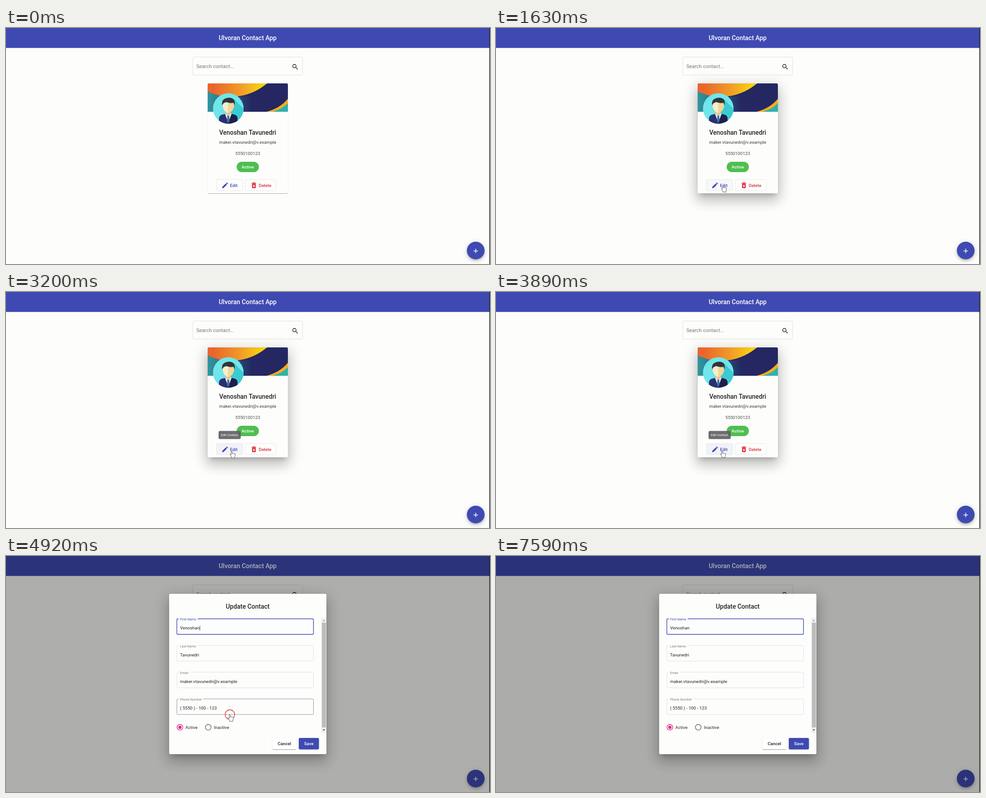
Write an HTML page that moves like this. It is 1068 px wide and 524 px high and loops after 8000 ms.

```html
<!DOCTYPE html>
<html lang="en">
<head>
<meta charset="utf-8">
<title>Contacts</title>
<style>
  html, body { margin: 0; width: 100%; height: 100%; overflow: hidden; background: #fdfdfc; }
  svg { display: block; width: 100%; height: 100%; font-family: Roboto, sans-serif; }
</style>
</head>
<body>
<svg id="stage" viewBox="0 0 1068 524" preserveAspectRatio="none"></svg>
<script>
const LOOP = 8000;
const UNIT = 0.695; // stage pixels per layout pixel
const PAPER = '#fdfdfc', INDIGO = '#3e4ab2', RED = '#dc2f3c', PINK = '#e3268b', INK = '#232323';
const BODY = 14 * UNIT, TITLE = 20 * UNIT, LABEL = 10.5 * UNIT;

const contact = {
  first: 'Venoshan', last: 'Tavunedri',
  email: 'maker.vtavunedri@v.example',
  phone: '5550100123', phoneMask: '( 5550 ) - 100 - 123'
};

// Elevation layers: offset y, blur, spread, alpha
const elevation = {
  1: [[2, 1, -1, .2], [1, 1, 0, .14], [1, 3, 0, .12]],
  2: [[3, 1, -2, .2], [2, 2, 0, .14], [1, 5, 0, .12]],
  6: [[3, 5, -1, .2], [6, 10, 0, .14], [1, 18, 0, .12]],
  24: [[11, 15, -7, .2], [24, 38, 3, .14], [9, 46, 8, .12]]
};

const icons = {
  search: 'M15.5 14h-.79l-.28-.27A6.47 6.47 0 0 0 16 9.5 6.5 6.5 0 1 0 9.5 16c1.61 0 3.09-.59 4.23-1.57l.27.28v.79l5 4.99L20.49 19zm-6 0a4.5 4.5 0 1 1 0-9 4.5 4.5 0 0 1 0 9z',
  edit: 'M3 17.25V21h3.75L17.81 9.94l-3.75-3.75zM20.71 7.04a1 1 0 0 0 0-1.41l-2.34-2.34a1 1 0 0 0-1.41 0l-1.83 1.83 3.75 3.75z',
  remove: 'M6 19c0 1.1.9 2 2 2h8c1.1 0 2-.9 2-2V7H6zm2.46-7.12l1.41-1.41L12 12.59l2.12-2.12 1.41 1.41L13.41 14l2.12 2.12-1.41 1.41L12 15.41l-2.12 2.12-1.41-1.41L10.59 14zM15.5 4l-1-1h-5l-1 1H5v2h14V4z'
};

const rect = (x, y, w, h, r, fill, extra = '') =>
  `<rect x="${x}" y="${y}" width="${w}" height="${h}" rx="${r}" fill="${fill}" ${extra}/>`;
const outline = (x, y, w, h, color, extra = '') =>
  rect(x, y, w, h, 2.5, 'none', `stroke="${color}" ${extra}`);
const text = (x, y, size, string, fill = INK, extra = '') =>
  `<text x="${x}" y="${y}" font-size="${size}" fill="${fill}" ${extra}>${string}</text>`;
const MID = 'text-anchor="middle"', BOLD = 'font-weight="500"', MID_BOLD = MID + ' ' + BOLD;
const icon = (name, x, y, fill) =>
  `<path transform="translate(${x} ${y}) scale(${UNIT})" d="${icons[name]}" fill="${fill}"/>`;
const shadow = (level, x, y, w, h, r) => elevation[level].map(([dy, blur, spread, alpha]) => {
  const s = spread * UNIT;
  return rect(x - s, y + dy * UNIT - s, w + 2 * s, h + 2 * s, r, '#000',
    `opacity="${alpha}" style="filter:blur(${blur * UNIT / 2}px)"`);
}).join('');

const banner = `
  <g clip-path="url(#bannerClip)">
    ${rect(445, 123, 177, 63, 0, '#242761')}
    <path d="M445 141Q490 158 545 150L560 186H445Z" fill="url(#teal)"/>
    <path d="M445 123H576Q550 145 517 151Q478 157 445 141Z" fill="url(#sunset)"/>
    <path d="M622 157Q605 178 575 186H622Z" fill="#f6ac1c"/>
    <path d="M622 167Q610 180 588 186H622Z" fill="#2fb0ae"/>
  </g>`;

const avatar = `
  <g clip-path="url(#avatarClip)">
    <circle cx="490.5" cy="178.7" r="34" fill="#70e6ea"/>
    <path d="M502 157L530 185V215H508L492 190Z" fill="#3ccbd3"/>
    <path d="M470 215V201Q470 194 478 192L490.5 189V215Z" fill="#2a3170"/>
    <path d="M511 215V201Q511 194 503 192L490.5 189V215Z" fill="#1d1f4c"/>
    <path d="M483 190L490.5 210L498 190Z" fill="#f1f3f5"/>
    <path d="M488.5 194H492.5L493 207 490.5 211 488 207Z" fill="#3d6ea8"/>
    <path d="M485 182H496V191L490.5 195 485 191Z" fill="#e5c68f"/>
    <path d="M478 166H490.5V189Q480 186 478 174Z" fill="#fdebc5"/>
    <path d="M503.500 166H490.5V189Q501 186 503.500 174Z" fill="#f1d69c"/>
    <path d="M477 172Q475 160 483 157Q491 153 499 156Q507 160 504 172L502 166Q494 168 486 164L480 167Z" fill="#333338"/>
  </g>`;

const page = `
  ${rect(0, 0, 1068, 524, 0, PAPER)}
  ${rect(0, 0, 1068, 44.300, 0, INDIGO)}
  ${text(533.3, 27, TITLE, 'Ulvoran Contact App', '#fff', MID_BOLD)}
  ${outline(412, 64.5, 242.5, 40, '#e2e1d8')}
  ${text(420, 89, 16 * UNIT, 'Search contact...', '#757575')}
  ${icon('search', 629.8, 78, '#1c1c1c')}
  <g id="cardRest">${shadow(1, 445, 123, 177, 244, 3)}</g>
  <g id="cardRaised">${shadow(24, 445, 123, 177, 244, 3)}</g>
  ${rect(445, 123, 177, 244, 3, PAPER)}
  ${banner}${avatar}
  ${text(533.3, 237.3, TITLE, contact.first + ' ' + contact.last, INK, MID_BOLD)}
  ${text(533.3, 256.8, BODY, contact.email, '#3c3c3c', MID)}
  ${text(533.3, 282.3, BODY, contact.phone, '#4a4a4a', MID)}
  ${rect(509, 297, 49, 23, 11.5, '#4fbe50')}
  ${text(533.4, 312, BODY, 'Active', '#fff', MID_BOLD)}
  ${rect(464.5, 336.5, 57.5, 24.5, 2.5, '#f2f2f9', 'id="editHover"')}
  ${outline(464.5, 336.5, 57.5, 24.5, '#e6e6ea')}
  ${icon('edit', 475, 341, INDIGO)}
  ${text(494.3, 352.5, BODY, 'Edit', INDIGO, BOLD)}
  ${outline(528, 336.5, 68.5, 24.5, '#e9e9e7')}
  ${icon('remove', 538.7, 341, RED)}
  ${text(557.8, 352.5, BODY, 'Delete', RED, BOLD)}
  <g id="tooltip">
    ${rect(469, 308.5, 49, 18, 3, '#616161', 'opacity=".92"')}
    ${text(493.2, 320, 10 * UNIT, 'Edit Contact', '#fff', MID)}
  </g>
  ${shadow(6, 1017, 474.5, 39, 39, 19.5)}
  <circle cx="1036.5" cy="494" r="19.5" fill="${INDIGO}"/>
  <path d="M1031.5 495h10M1036.5 490v10" stroke="#fff" stroke-width="1.5"/>`;

const field = (i, label, gap, value) => {
  const y = 139.5 + i * 59.3;
  return `
    ${outline(377, y, 301.5, 34.500, '#e1e1e5', `id="field${i}"`)}
    ${rect(381, y - 2, gap, 4, 0, PAPER)}
    ${text(384, y + 3.8, LABEL, label, '#7c7c7c', `id="label${i}"`)}
    ${text(384, y + 23.9, BODY, value)}`;
};

const dialog = `
  ${shadow(24, 360, 84, 347, 356, 3)}
  ${rect(360, 84, 347, 356, 3, PAPER)}
  ${text(533.3, 117, TITLE, 'Update Contact', INK, MID_BOLD)}
  ${field(0, 'First Name', 42, contact.first)}
  ${field(1, 'Last Name', 41, contact.last)}
  ${field(2, 'Email', 24, contact.email)}
  ${field(3, 'Phone Number', 54, contact.phoneMask)}
  ${rect(427.5, 154.5, .8, 11, 0, INK, 'id="caret"')}
  <circle id="radio" cx="383.7" cy="380.3" r="6.300" fill="none" stroke-width="1.4"/>
  <circle id="radioDot" cx="383.7" cy="380.3" r="3.6" fill="${PINK}"/>
  ${text(395.8, 384, BODY, 'Active')}
  <circle cx="446.3" cy="380.3" r="6.300" fill="none" stroke="#6c6c6c" stroke-width="1.4"/>
  ${text(458.7, 384, BODY, 'Inactive')}
  ${rect(695.5, 137, 11.5, 256, 0, '#f0f0f0')}
  ${rect(697, 148, 9, 232.5, 0, '#bdbdbd')}
  <path d="M698.500 144.500L701.300 141.500 704 144.500Z" fill="#a0a0a0"/>
  <path d="M698.500 385L701.300 388 704 385Z" fill="#404040"/>
  ${shadow(2, 588, 404, 53, 25, 2.5)}${rect(588, 404, 53, 25, 2.5, '#fff')}
  ${text(614.4, 420, BODY, 'Cancel', INK, MID_BOLD)}
  ${shadow(2, 646, 404, 44.500, 25, 2.5)}${rect(646, 404, 44.500, 25, 2.5, INDIGO)}
  ${text(668.2, 420, BODY, 'Save', '#fff', MID_BOLD)}`;

const stage = document.getElementById('stage');
stage.innerHTML = `
  <defs>
    <clipPath id="bannerClip"><path d="M445 186V126a3 3 0 0 1 3-3H619a3 3 0 0 1 3 3V186Z"/></clipPath>
    <clipPath id="avatarClip"><circle cx="490.5" cy="178.7" r="34"/></clipPath>
    <linearGradient id="sunset">
      <stop offset=".1" stop-color="#e9652b"/><stop offset=".5" stop-color="#f0942a"/><stop offset=".9" stop-color="#f8cf12"/>
    </linearGradient>
    <linearGradient id="teal">
      <stop offset="0" stop-color="#31979f"/><stop offset=".85" stop-color="#242761"/>
    </linearGradient>
  </defs>
  ${page}
  ${rect(0, 0, 1068, 524, 0, '#000', 'id="backdrop"')}
  <g id="dialog">${dialog}</g>
  <circle id="ripple" fill="none" stroke="#e0343a" stroke-width="1.3"/>
  <g id="pointer" fill="#fff" stroke="#444" stroke-width="1.2" stroke-linejoin="round">
    <path id="arrow" transform="scale(${UNIT})" d="M0 0V17L4 13.2 6.6 19.2 9 18.2 6.5 12.4H12Z"/>
    <path id="hand" transform="scale(.72) translate(-5.5 0)" d="M5.5.5C4.400.5 4 1.400 4 2.200V11.500L2.600 9.900C1.800 9.100.6 9.400.4 10.300c-.1.5.1 1 .4 1.500l4.200 6.200v3.200h9.500v-3l1.500-4.500V9.200c0-1.800-2.600-1.900-2.700-.3-.1-1.900-2.700-2-2.900-.4C10.300 6.600 7.500 6.500 7 8V2.200C7 1.200 6.500.5 5.500.5Z"/>
  </g>
  ${rect(1066.6, 0, 1.4, 524, 0, '#222')}`;

const $ = id => document.getElementById(id);
const set = (id, attrs) => { for (const key in attrs) $(id).setAttribute(key, attrs[key]); };
const show = (id, opacity) => set(id, { opacity: +opacity });
const ramp = (t, start, length) => Math.min(1, Math.max(0, (t - start) / length));
const smooth = p => p * p * (3 - 2 * p);

function bezier(x1, y1, x2, y2) {
  const at = (a, b, s) => 3 * a * s * (1 - s) ** 2 + 3 * b * s * s * (1 - s) + s ** 3;
  return p => {
    let low = 0, high = 1;
    for (let i = 0; i < 24; i++) {
      const s = (low + high) / 2;
      if (at(x1, x2, s) < p) low = s; else high = s;
    }
    return at(y1, y2, high);
  };
}
const decelerate = bezier(0, 0, .2, 1), swift = bezier(.25, .8, .25, 1);

// Pointer path: time, x, y
const path = [
  [80, 1075, 300], [910, 600, 250], [1250, 545, 300], [1630, 501, 349], [2400, 497, 354],
  [2760, 497, 354], [3600, 499, 352.5], [4070, 499, 352.5], [4500, 494, 352],
  [5200, 494, 352], [5590, 470, 545]
];
function pointerAt(t) {
  const i = path.findIndex(key => key[0] > t);
  if (i < 0) return path[path.length - 1].slice(1);
  if (i === 0) return path[0].slice(1);
  const [t0, x0, y0] = path[i - 1], [t1, x1, y1] = path[i];
  const p = smooth((t - t0) / (t1 - t0));
  return [x0 + (x1 - x0) * p, y0 + (y1 - y0) * p];
}

const CLICK = 4665, FOCUS = 4815, BLINK = 530;

function draw(t) {
  const closing = ramp(t, CLICK, 300);
  const raised = swift(ramp(t, 900, 250)) * (1 - closing);
  show('cardRaised', raised);
  show('cardRest', 1 - raised);
  show('editHover', ramp(t, 1560, 150) * (1 - closing));
  show('tooltip', decelerate(ramp(t, 1720, 150)) * (1 - closing));

  const open = decelerate(ramp(t, CLICK + 2, 150));
  const scale = .7 + .3 * open;
  show('backdrop', .32 * swift(ramp(t, CLICK - 5, 400)));
  set('dialog', {
    opacity: open,
    transform: `translate(533.5 262) scale(${scale}) translate(-533.5 -262)`
  });

  const focused = t >= FOCUS, phoneHover = t > 4850 && t < 5300;
  set('field0', { stroke: focused ? INDIGO : '#e1e1e5', 'stroke-width': focused ? 1.4 : 1 });
  set('label0', { fill: focused ? INDIGO : '#7c7c7c' });
  set('field3', { stroke: phoneHover ? '#92929f' : '#e1e1e5' });
  set('radio', { stroke: focused ? PINK : '#6c6c6c' });
  show('radioDot', focused);
  show('caret', focused && Math.floor((t - FOCUS - 35) / BLINK) % 2 === 0);

  set('ripple', {
    cx: 494, cy: 352, r: Math.max(0, (t - CLICK) * .041),
    opacity: t > CLICK ? 1 - ramp(t, 4940, 90) : 0
  });
  const [x, y] = pointerAt(t);
  const onButton = t > 1560 && t < 5200;
  set('pointer', { transform: `translate(${x} ${y})` });
  show('arrow', !onButton);
  show('hand', onButton);
}

function tick() {
  draw(performance.now() % LOOP);
  requestAnimationFrame(tick);
}
tick();
</script>
</body>
</html>
```
